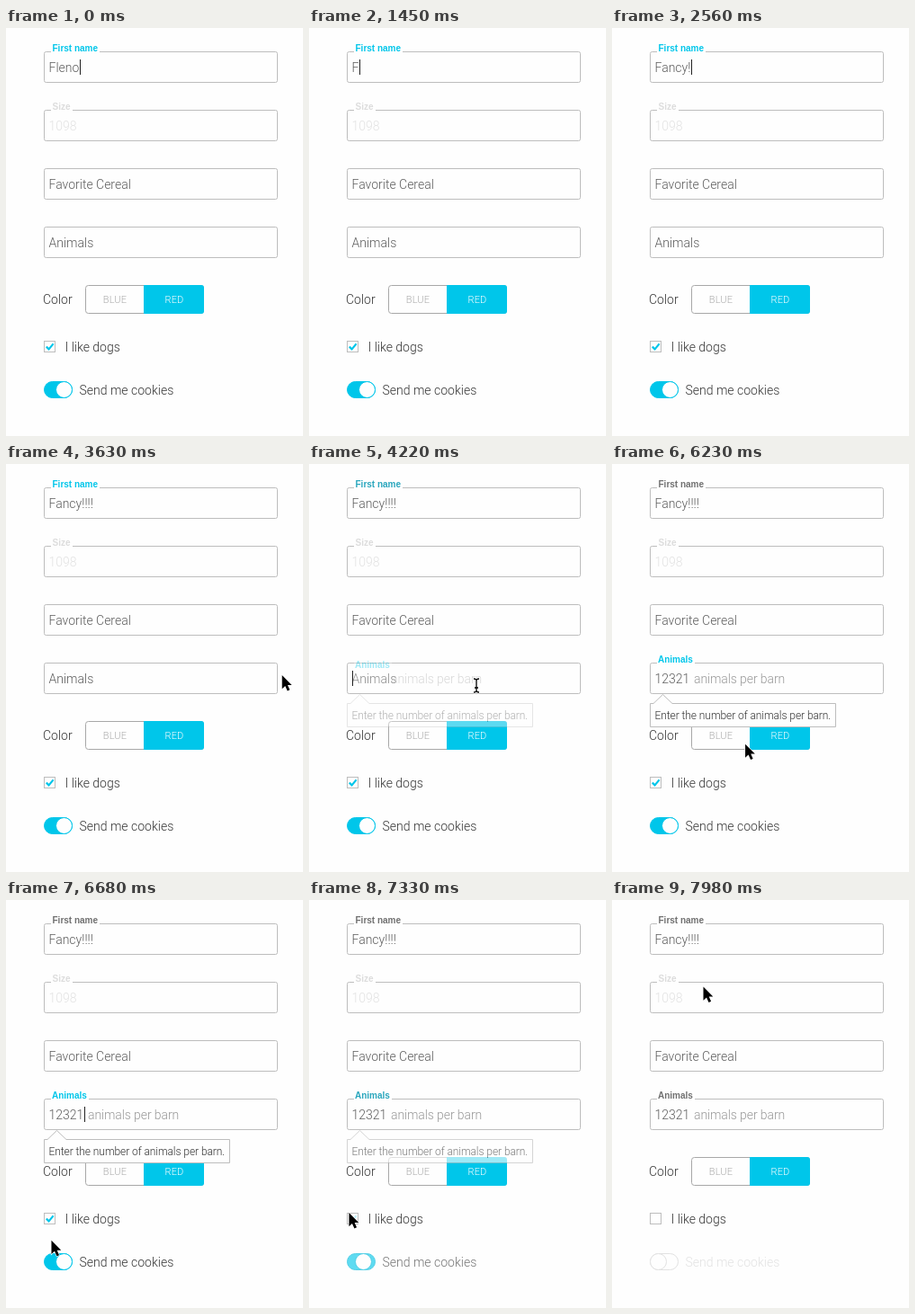
An HTML page that plays this animation: 330 by 454 pixels, repeating every 8000 ms.

```html
<!DOCTYPE html>
<html lang="en">
<head>
<meta charset="utf-8">
<title>Form</title>
<style>
html, body { margin: 0; width: 100%; height: 100%; overflow: hidden; background: #fefefe; }
svg { display: block; }
text { font: 300 14px Roboto, Arial, sans-serif; fill: #333; white-space: pre; }
.value { fill: #5c5c5c; }
.off { fill: #e2e2e2; }
.label { font: 700 10px "Liberation Sans", Arial, sans-serif; }
.label.off { fill: #dcdcdc; }
.small { font-size: 12px; letter-spacing: -.07px; }
.seg { font-size: 11px; letter-spacing: .2px; text-anchor: middle; }
.box { fill: #fefefe; stroke: #bdbdbd; }
</style>
</head>
<body>
<svg width="330" height="454" viewBox="0 0 330 454">
  <g id="fields"></g>
  <g id="nameLabel"><rect x="50" y="20" width="54" height="8" fill="#fefefe"/><text class="label" x="51.5" y="26">First name</text></g>
  <rect x="50" y="85" width="24" height="8" fill="#fefefe"/>
  <text class="label off" x="51.5" y="91">Size</text>
  <g id="animalLabel"><rect x="50" y="215" width="42" height="8" fill="#fefefe"/><text class="label" x="51" y="221">Animals</text></g>

  <text id="name" class="value" x="47.5" y="49"></text>
  <text class="off" x="47.5" y="114">1098</text>
  <text class="value" x="47.5" y="179">Favorite Cereal</text>
  <text id="hint" class="value" x="47.5" y="244">Animals</text>
  <text id="count" class="value" x="47.5" y="244"></text>
  <text id="suffix" x="91" y="244" style="fill:#999;letter-spacing:-.1px">animals per barn</text>
  <rect id="caret" width="1" height="17" fill="#222"/>

  <text x="41" y="307">Color</text>
  <rect class="box" x="88.5" y="286.5" width="131" height="31" rx="3" style="stroke:#a8a8a8"/>
  <path d="M153 286H217a3 3 0 0 1 3 3V315a3 3 0 0 1-3 3H153Z" fill="#00c6ea"/>
  <text class="seg" x="121" y="306" style="fill:#aaa">BLUE</text>
  <text class="seg" x="187" y="306" style="fill:#fff">RED</text>

  <rect class="box" x="42.5" y="348.5" width="12" height="12"/>
  <path id="tick" d="M44.8 354.6L47.6 357.4L52.6 351.4" fill="none" stroke="#00c6ea" stroke-width="2.2"/>
  <text x="65.5" y="360">I like dogs</text>

  <rect id="track" x="42.5" y="393.5" width="31" height="18" rx="9"/>
  <circle id="knob" cy="402.5" r="9" fill="#fefefe"/>
  <text id="cookies" x="81.5" y="408">Send me cookies</text>

  <g id="tip">
    <path class="box" d="M42.5 266.5H46L56.5 256.5L67 266.5H248.5V292.5H42.5Z" stroke-linejoin="round"/>
    <text class="small" x="47.5" y="284">Enter the number of animals per barn.</text>
  </g>

  <path id="arrow" d="M0 0V15.2L3.5 11.9L6 17.4L8.6 16.3L6.2 10.9H10.8Z" fill="#000" stroke="#fff" stroke-width="1.2" paint-order="stroke"/>
  <g id="beam" fill="none">
    <path d="M-3 -7Q0 -7 0 -5Q0 -7 3 -7M0 -5V6M-3 8Q0 8 0 6Q0 8 3 8M-2 3H2" stroke="#fff" stroke-width="3"/>
    <path d="M-3 -7Q0 -7 0 -5Q0 -7 3 -7M0 -5V6M-3 8Q0 8 0 6Q0 8 3 8M-2 3H2" stroke="#000" stroke-width="1.3"/>
  </g>
</svg>
<script>
const LOOP = 8000, FOCUS = 3940, BLUR = 7220;
const CYAN = [0, 198, 234], GRAY = [112, 112, 112], PALE = [226, 226, 226],
      DARK = [51, 51, 51], PAPER = [254, 254, 254];
const $ = id => document.getElementById(id);
const set = (id, attrs) => { for (const k in attrs) $(id).setAttribute(k, attrs[k]); };
const ramp = (t, from, to) => Math.min(1, Math.max(0, (t - from) / (to - from)));
const ease = p => p * p * (3 - 2 * p);
const mix = (a, b, p) => a + (b - a) * p;
const blend = (a, b, p) => `rgb(${a.map((v, i) => Math.round(mix(v, b[i], p)))})`;

$("fields").innerHTML = [26, 91, 156, 221].map(y =>
  `<rect class="box" x="42.5" y="${y + .5}" width="259" height="34" rx="2"/>`).join("");

const nameKeys = [
  [0, "Fleno"], [1010, "Flen"], [1190, "Fle"], [1300, "Fl"], [1450, "F"],
  [1900, "Fa"], [2020, "Fan"], [2140, "Fanc"], [2260, "Fancy"],
  [2560, "Fancy!"], [2770, "Fancy!!"], [2940, "Fancy!!!"], [3150, "Fancy!!!!"]];
const countKeys = [
  [FOCUS, ""], [4770, "1"], [4890, "12"], [5100, "123"], [5270, "1232"], [5510, "12321"]];

// time, x, y of the mouse
const mouse = [
  [3630, 307, 235], [3720, 282, 240], [3820, 220, 246], [3930, 187, 247], [4220, 186, 246],
  [4400, 188, 245], [5970, 188, 245], [6100, 176, 268], [6250, 144, 318], [6400, 98, 374],
  [6520, 66, 400], [6580, 57, 402], [6680, 50.5, 379], [6770, 48, 365],
  [6900, 45, 358], [7040, 43, 354], [7300, 43, 354], [7450, 50, 325],
  [7620, 70, 235], [7800, 92, 140], [7980, 101.5, 96.5]];

const lastKey = (keys, t) => keys.filter(k => k[0] <= t).pop() || [0, ""];

function mouseAt(t) {
  const i = mouse.findIndex(m => m[0] > t);
  if (i < 0) return mouse[mouse.length - 1].slice(1);
  const a = mouse[i - 1], b = mouse[i], p = ramp(t, a[0], b[0]);
  return [mix(a[1], b[1], p), mix(a[2], b[2], p)];
}

function drawCaret(t) {
  const inName = t < FOCUS;
  const [since] = lastKey(inName ? nameKeys : countKeys, t);
  const text = $(inName ? "name" : "count");
  const width = text.textContent ? text.getComputedTextLength() : 0;
  const lit = t < BLUR && (t - since + 20) % 1000 < 500;
  set("caret", { x: Math.round(47.7 + width), y: inName ? 35 : 230, opacity: +lit });
}

function drawMouse(t) {
  const shown = t >= mouse[0][0];
  const [x, y] = shown ? mouseAt(t) : [0, 0];
  const overField = x > 42 && x < 302 && y > 221 && y < 256 && t < 7000;
  const transform = `translate(${x} ${y})`;
  set("arrow", { transform, opacity: +(shown && !overField) });
  set("beam", { transform, opacity: +(shown && overField) });
}

function draw(t) {
  $("name").textContent = lastKey(nameKeys, t)[1];
  $("count").textContent = lastKey(countKeys, t)[1];

  const open = ramp(t, 4110, 4410), shut = ramp(t, BLUR, BLUR + 300);
  $("nameLabel").lastChild.style.fill = blend(CYAN, GRAY, open);
  $("animalLabel").lastChild.style.fill = blend(CYAN, GRAY, shut);
  set("animalLabel", { opacity: open, transform: `translate(0 ${10 * (1 - open)})` });
  set("hint", { opacity: 1 - ease(open) });
  set("suffix", { opacity: open });
  set("tip", { opacity: open * (1 - shut) });

  set("tick", { opacity: 1 - ramp(t, BLUR, BLUR + 150) });
  const edge = blend(CYAN, PALE, shut);
  set("track", { fill: blend(CYAN, PAPER, shut), stroke: edge });
  set("knob", { cx: mix(64.5, 51.5, ease(shut)), stroke: edge });
  $("cookies").style.fill = blend(DARK, PALE, shut);

  drawCaret(t);
  drawMouse(t);
}

const start = performance.now();
function tick() {
  draw((performance.now() - start) % LOOP);
  requestAnimationFrame(tick);
}
tick();
</script>
</body>
</html>
```
